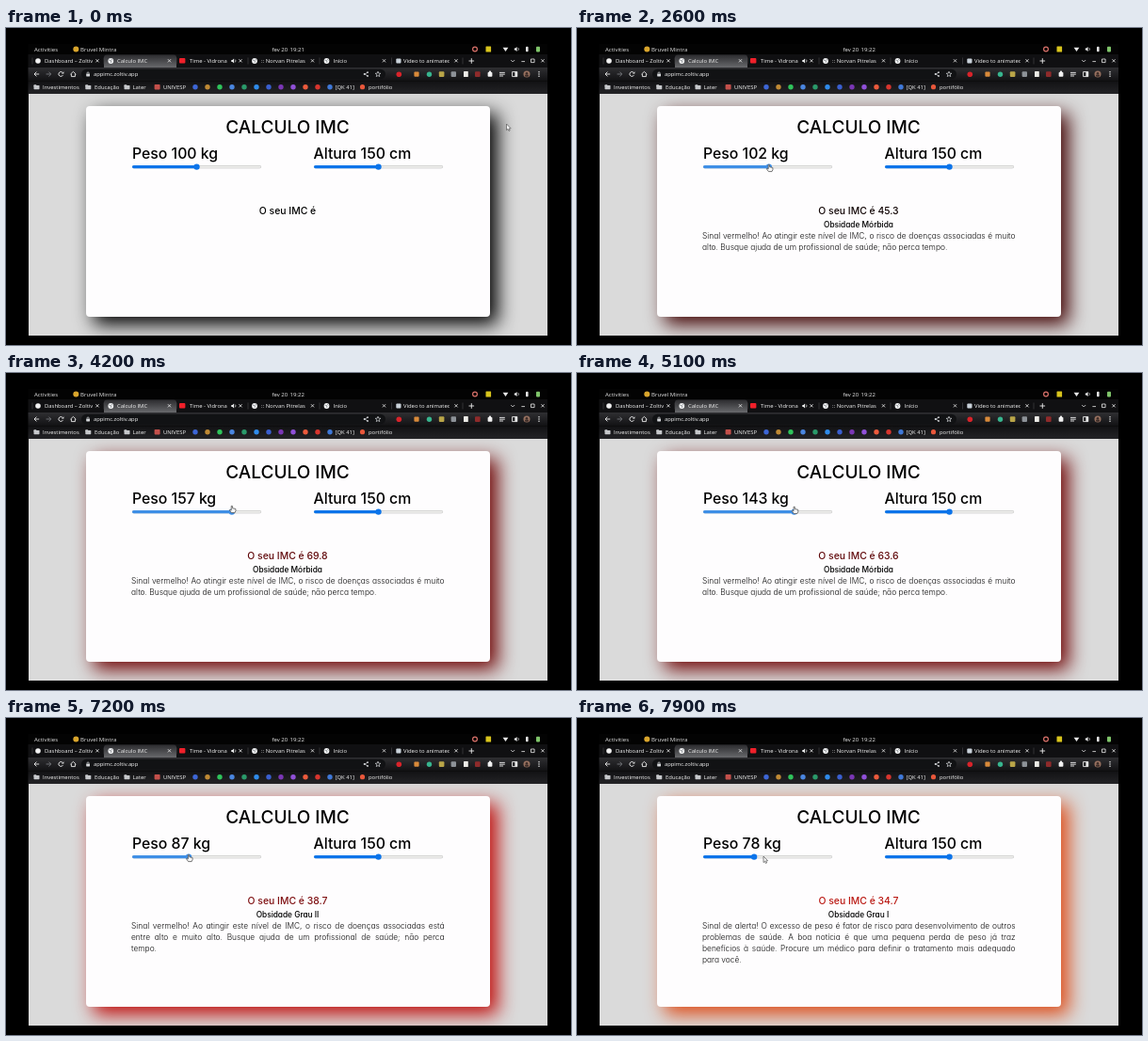
These frames come from a looping animation (600 by 337 pixels, 8 s). An HTML page with a canvas:

```html
<!DOCTYPE html>
<html lang="pt-BR">
<head>
<meta charset="utf-8">
<title>Calculo IMC</title>
<style>
html, body { margin: 0; width: 600px; height: 337px; overflow: hidden; background: #000; }
body { position: relative; }
canvas { position: absolute; left: 0; top: 0; width: 600px; height: 337px; }
#page { position: absolute; left: 23.5px; top: 70px; width: 551.5px; height: 256.5px; overflow: hidden; background: #dadada; }
#card { position: absolute; left: 61.5px; top: 13px; width: 428.5px; height: 223.5px; border-radius: 4px; background: #fefdfe; }
#text { position: absolute; inset: 0; color: #000; font-family: Inter, "Open Sans", sans-serif; font-weight: 500;
  font-feature-settings: "cv11"; font-optical-sizing: none; white-space: nowrap; }
#text > div { position: absolute; line-height: 20px; }
.mid { left: 85px; width: 428px; text-align: center; }
#title { top: 96.2px; font-size: 19px; }
.label { top: 124.2px; font-size: 15.8px; }
#weight { left: 134px; }
#height { left: 326.5px; }
#score { top: 184.6px; font-size: 10.4px; }
#grade { top: 198.6px; font-size: 8.3px; }
#text #advice { left: 133px; top: 214.6px; width: 332.5px; font-size: 8.4px; font-weight: 300; line-height: 12.15px; color: #111; }
#advice div { text-align-last: justify; }
#advice div:last-child { text-align-last: left; }
</style>
</head>
<body>
<div id="page"><div id="card"></div></div>
<div id="text">
  <div id="title" class="mid">CALCULO IMC</div>
  <div id="weight" class="label"></div>
  <div id="height" class="label">Altura 150 cm</div>
  <div id="score" class="mid"></div>
  <div id="grade" class="mid"></div>
  <div id="advice"></div>
</div>
<canvas id="c"></canvas>
<script>
const LOOP = 8000;
const $ = id => document.getElementById(id);
const canvas = $('c'), g = canvas.getContext('2d');
const dpr = window.devicePixelRatio || 1;
canvas.width = 600 * dpr;
canvas.height = 337 * dpr;

const GRADES = [
  ['', []],
  ['Obsidade Mórbida', [
    'Sinal vermelho! Ao atingir este nível de IMC, o risco de doenças associadas é muito',
    'alto. Busque ajuda de um profissional de saúde; não perca tempo.']],
  ['Obsidade Grau II', [
    'Sinal vermelho! Ao atingir este nível de IMC, o risco de doenças associadas está',
    'entre alto e muito alto. Busque ajuda de um profissional de saúde; não perca',
    'tempo.']],
  ['Obsidade Grau I', [
    'Sinal de alerta! O excesso de peso é fator de risco para desenvolvimento de outros',
    'problemas de saúde. A boa notícia é que uma pequena perda de peso já traz',
    'benefícios à saúde. Procure um médico para definir o tratamento mais adequado',
    'para você.']]
];

// Keyframes: [time, ...values]
const WEIGHT = [[2250, 100], [2600, 102], [3000, 107], [4200, 157], [4700, 160], [5600, 122],
  [6200, 101], [6900, 89.6], [7200, 87], [7550, 78.4], [7650, 78]];
const ARROW = [[100, 531.5, 102], [900, 250.5, 141], [1150, 250.5, 141], [1850, 203, 146],
  [7750, 189, 147], [7900, 198, 147]];
const HAND_Y = [[2600, 149], [4200, 145], [4800, 145], [6200, 149]];
const GLOW = [[2300, 0, 0, 0], [2600, 66, 4, 4], [3300, 112, 6, 6], [6900, 112, 6, 6],
  [7200, 192, 14, 12], [7550, 200, 22, 14], [7900, 222, 76, 24]];
const INK = [[2300, 0, 0, 0], [2600, 16, 4, 4], [3300, 96, 8, 10], [6900, 96, 8, 10],
  [7200, 126, 14, 16], [7550, 146, 16, 16], [7900, 186, 24, 18]];

function at(keys, t, ease = k => k) {
  let i = 0;
  while (i < keys.length - 1 && t >= keys[i + 1][0]) i++;
  const a = keys[i], b = keys[i + 1];
  if (!b || t <= a[0]) return a.slice(1);
  const k = ease((t - a[0]) / (b[0] - a[0]));
  return a.slice(1).map((v, j) => v + (b[j + 1] - v) * k);
}
const smooth = k => k * k * (3 - 2 * k);
const rgb = v => `rgb(${v.map(Math.round).join(',')})`;

function fade(y0, y1, from, to) {
  const f = g.createLinearGradient(0, y0, 0, y1);
  f.addColorStop(0, from);
  f.addColorStop(1, to);
  return f;
}
function rect(x, y, w, h, color, r = 0) {
  g.fillStyle = color;
  g.beginPath();
  g.roundRect(x, y, w, h, r);
  g.fill();
}
function dot(x, y, r, color) {
  g.fillStyle = color;
  g.beginPath();
  g.arc(x, y, r, 0, 7);
  g.fill();
}
function line(pts, color = '#eceded', w = 0.9) {
  g.strokeStyle = color;
  g.lineWidth = w;
  g.beginPath();
  for (let i = 0; i < pts.length; i += 2) g.lineTo(pts[i], pts[i + 1]);
  g.stroke();
}
function ring(x, y, r, color = '#eceded', from = 0, to = 7, w = 0.9) {
  g.strokeStyle = color;
  g.lineWidth = w;
  g.beginPath();
  g.arc(x, y, r, from, to);
  g.stroke();
}
function poly(pts, fill, stroke, w = 0.7) {
  g.beginPath();
  for (let i = 0; i < pts.length; i += 2) g.lineTo(pts[i], pts[i + 1]);
  g.closePath();
  g.fillStyle = fill;
  g.fill();
  if (stroke) {
    g.strokeStyle = stroke;
    g.lineWidth = w;
    g.lineJoin = 'round';
    g.stroke();
  }
}
function label(s, x, y, color = '#f4f4f4', size = 5.9) {
  g.font = `500 ${size}px "Open Sans", "Noto Sans", sans-serif`;
  g.fillStyle = color;
  g.fillText(s, x, y);
}
function cross(x, y, r = 1.6) {
  line([x - r, y - r, x + r, y + r], '#eceded', 0.8);
  line([x + r, y - r, x - r, y + r], '#eceded', 0.8);
}
function globe(x, y) {
  dot(x, y, 2.9, '#f6f7f8');
  line([x - 2, y - 1, x + 0.4, y - 0.2, x + 0.2, y + 1.8], '#777b80', 0.8);
  line([x + 0.4, y - 2.2, x + 2, y - 0.6], '#777b80', 0.7);
}
function speaker(x, y, color = '#eceded') {
  poly([x - 2.2, y - 1, x - 1, y - 1, x + 0.6, y - 2.4, x + 0.6, y + 2.4, x - 1, y + 1, x - 2.2, y + 1], color);
  ring(x + 0.6, y, 1.8, color, -0.9, 0.9, 0.7);
}
function folder(x, y) {
  rect(x, y - 2.4, 2.8, 2, '#c6c8cb', 0.5);
  rect(x, y - 1.7, 6, 4.2, '#c6c8cb', 0.6);
}

function topBar(t) {
  rect(23.5, 17, 551.5, 11, '#030303');
  label('Activities', 30, 24.6, '#e6e6e6', 6.1);
  dot(74.3, 22.5, 3, '#d9a52c');
  label('Bruvel Mintra', 79, 24.6, '#e6e6e6', 6.1);
  label('fev 20', 282.5, 24.6, '#f0f0f0', 6);
  label(t < 2200 ? '19:21' : '19:22', 301.5, 24.6, '#f0f0f0', 6);
  ring(498, 22.5, 2.4, '#d9716a', 0, 7, 1.2);
  rect(509.5, 19.5, 5.6, 6, '#d8c41c', 0.5);
  poly([527.6, 20.8, 533.4, 20.8, 530.5, 25], '#e6e6e6');
  speaker(542, 22.5);
  rect(552, 19.8, 2.6, 5.4, '#e6e6e6', 1);
  rect(563, 19.8, 4, 5.6, '#7fc46a', 0.8);
}

function tab(x, text, closeX, textX, limit) {
  g.save();
  g.beginPath();
  g.rect(textX, 28, limit - textX, 13);
  g.clip();
  label(text, textX, 37.1);
  g.restore();
  cross(closeX, 34.8);
  line([x, 31.5, x, 38.5], '#4a4b4e', 0.6);
}

function tabStrip() {
  rect(23.5, 28, 551.5, 14, '#101012');
  rect(104, 28.6, 77, 13.4, fade(29, 42, '#2e2e31', '#68696c'), [3, 3, 0, 0]);
  dot(34, 35, 2.8, '#f1f1f1');
  tab(28, 'Dashboard – Zoltiv', 97, 41, 92);
  globe(111.3, 35);
  tab(104, 'Calculo IMC', 173.5, 118, 168);
  rect(184, 32, 6.4, 5.6, '#f0202a', 1);
  tab(181, 'Time - Vidrona', 249, 195, 237);
  speaker(241.5, 35);
  globe(264, 35);
  tab(257, ':: Norvan Pitrelas', 325.5, 271, 320);
  globe(340.5, 35);
  tab(333, 'Início', 401.5, 347.5, 396);
  rect(414.3, 32.4, 5.2, 5.2, '#c9d2da', 1);
  tab(409.5, 'Video to animated', 478, 422, 471);
  line([485, 31.5, 485, 38.5], '#4a4b4e', 0.6);
  line([491.5, 35, 497.1, 35]);
  line([494.3, 32.2, 494.3, 37.8]);
  line([536.2, 34, 538.2, 36, 540.2, 34], '#e0e0e0', 0.8);
  line([547.4, 35.6, 551, 35.6], '#eceded', 0.8);
  g.strokeRect(557.5, 33, 3.6, 3.6);
  cross(570, 34.8);
}

function toolbar() {
  rect(23.5, 42, 551.5, 14.5, fade(42, 56.5, '#2f2f32', '#111113'));
  rect(23.5, 56.5, 551.5, 13.5, fade(56.5, 70, '#121214', '#232326'));
  line([30, 49, 35.2, 49]);
  line([32.4, 46.6, 30, 49, 32.4, 51.4]);
  line([42.6, 49, 47.8, 49], '#77797d');
  line([45.4, 46.6, 47.8, 49, 45.4, 51.4], '#77797d');
  ring(58.3, 49, 2.4, '#eceded', 0.4, 5.6);
  poly([59, 48.6, 61.4, 48.6, 61.4, 46.2], '#eceded');
  line([68.4, 49.2, 71.4, 46.4, 74.4, 49.2]);
  line([69.4, 48.8, 69.4, 51.6, 73.4, 51.6, 73.4, 48.8]);
  rect(80, 43.8, 323, 10.6, '#111214', 5.3);
  rect(85.2, 48.4, 3.8, 3, '#d5d7da', 0.4);
  ring(87.1, 48.2, 1.2, '#d5d7da', 3.14, 6.29, 0.7);
  label('appimc.zoltiv.app', 93, 51, '#f6f6f6', 5.8);

  line([384, 47.4, 380.6, 49, 384, 50.8], '#d5d7da', 0.7);
  [[384, 47.2], [380.6, 49], [384, 51]].forEach(p => dot(p[0], p[1], 0.9, '#d5d7da'));
  const star = [];
  for (let i = 0; i < 10; i++) {
    const a = -Math.PI / 2 + i * Math.PI / 5, r = i % 2 ? 1.3 : 3;
    star.push(395 + r * Math.cos(a), 49.2 + r * Math.sin(a));
  }
  poly(star, '#111214', '#d5d7da', 0.7);

  dot(417.3, 49.2, 2.8, '#d8232a');
  rect(433.4, 46.6, 5.2, 5.2, '#d98a3a', 1);
  dot(449.5, 49.2, 2.7, '#37b58e');
  rect(459.8, 46.3, 5.6, 5.6, '#b9a548', 1);
  rect(472.6, 46.3, 5.4, 5.6, '#8d9298', 1);
  rect(486, 45.9, 4.8, 6.2, '#ecebe6', 0.6);
  rect(498, 46.2, 5.6, 5.8, '#8f2b2b', 1);
  rect(511.6, 47, 4.8, 4.8, '#f1f1f1', 0.8);
  dot(514, 46.8, 1.2, '#f1f1f1');
  line([524, 47.4, 529.8, 47.4]);
  line([524, 49.2, 529.8, 49.2]);
  line([524, 51, 528, 51]);
  g.strokeRect(537.6, 46.6, 5.2, 5);
  rect(540.4, 46.6, 2.4, 5, '#eceded');
  dot(553, 49, 3.5, '#96705f');
  dot(553, 48.2, 1.3, '#3d2d29');
  rect(551, 49.6, 4, 2.1, '#3d2d29', 1);
  [46.8, 49, 51.2].forEach(y => dot(566, y, 0.75, '#eceded'));
}

function bookmarks() {
  const y = 64.9;
  [29.5, 84.3, 125.5].forEach(x => folder(x, 62.7));
  label('Investimentos', 39, y);
  label('Educação', 94, y);
  label('Later', 134.5, y);
  rect(157.6, 60, 6, 5.4, '#c4504b', 0.8);
  label('UNIVESP', 167, y);
  ['#3d66d6', '#c08a34', '#2fc45b', '#4a86e0', '#2a9a6a', '#2f8bea', '#3a5fd0',
    '#7a36b5', '#9050d8', '#ec5a3c', '#d9352e', '#3f78d8']
    .forEach((c, i) => dot(201 + i * 13, 62.7, 2.7, c));
  label('[QK 41]', 349.5, y);
  dot(378.5, 62.7, 2.6, '#e8573b');
  label('portifólio', 385, y);
}

function slider(x, v, color) {
  const tx = x + 3 + 131 * v;
  rect(x, 146, 137, 3.2, '#b9b9b9', 1.6);
  rect(x + 0.4, 146.4, 136.2, 2.4, '#f0f0ee', 1.2);
  rect(x, 146, tx - x, 3.2, color, 1.6);
  dot(tx, 147.6, 3.2, color);
  return tx;
}

function arrow(x, y) {
  poly([x, y, x, y + 6.6, x + 1.5, y + 5.3, x + 2.5, y + 7.5, x + 3.6, y + 7, x + 2.7, y + 4.9, x + 4.6, y + 4.7],
    '#f4f4f4', '#555', 0.7);
}
function hand(x, y) {
  poly([x - 1.6, y - 3.6, x - 0.4, y - 3.6, x - 0.2, y - 1.2, x + 3, y - 0.6, x + 3.2, y + 1.4,
    x + 2.2, y + 3.6, x - 1.4, y + 3.6, x - 3.4, y + 0.8, x - 2.8, y, x - 1.6, y + 0.8], '#f6f6f6', '#555', 0.8);
}

let shown = -1;
function setGrade(n) {
  if (n === shown) return;
  shown = n;
  $('grade').textContent = GRADES[n][0];
  $('advice').innerHTML = GRADES[n][1].map(s => `<div>${s}</div>`).join('');
}

function draw(t) {
  const kg = Math.round(at(WEIGHT, t)[0]);
  const imc = kg / 2.25;
  const started = t >= 2300;
  $('weight').textContent = `Peso ${kg} kg`;
  $('score').textContent = 'O seu IMC é' + (started ? ' ' + imc.toFixed(1) : '');
  $('score').style.color = rgb(at(INK, t));
  $('card').style.boxShadow = `8px 8px 20px ${rgb(at(GLOW, t))}`;
  setGrade(!started ? 0 : imc >= 40 ? 1 : imc >= 35 ? 2 : 3);

  g.setTransform(dpr, 0, 0, dpr, 0, 0);
  g.clearRect(0, 0, 600, 337);
  topBar(t);
  tabStrip();
  toolbar();
  bookmarks();

  const held = t >= 1850 && t < 7750;
  const tx = slider(134, kg / 200, held ? '#3f8fe6' : '#0b74ea');
  slider(327, 0.5, '#0b74ea');
  if (held) hand(tx + 1, at(HAND_Y, t)[0]);
  else arrow(...at(ARROW, t, smooth));
}

const start = performance.now();
function tick() {
  draw((performance.now() - start) % LOOP);
  requestAnimationFrame(tick);
}
tick();
</script>
</body>
</html>
```
